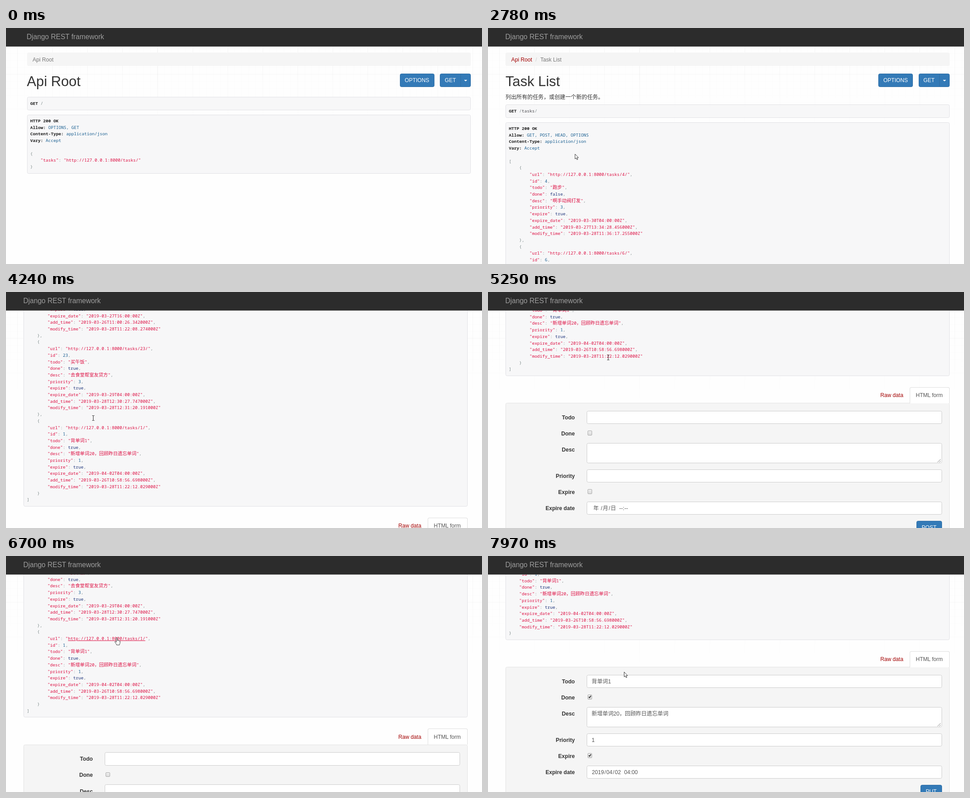
An HTML page for the animation above (8000 ms loop, 1061 by 528 pixels).

```html
<!DOCTYPE html>
<html lang="zh">
<head>
<meta charset="utf-8">
<title>Task API</title>
<style>
html, body { margin: 0; width: 100%; height: 100%; overflow: hidden; background: #fefefe; }
body { font: 12.13px/20px "Liberation Sans", "Noto Sans CJK SC", sans-serif; color: #333; }
#stage { position: relative; width: 1061px; height: 528px; overflow: hidden; }
#stage div { position: absolute; box-sizing: border-box; white-space: pre; }
#grid { left: -53px; top: -53px; width: 1120px; height: 300px;
  background:
    repeating-linear-gradient(90deg, #00000006 0 1px, #0000 1px 78.1px),
    repeating-linear-gradient(#00000006 0 1px, #0000 1px 78.1px),
    repeating-linear-gradient(90deg, #00000003 0 1px, #0000 1px 15.62px),
    repeating-linear-gradient(#00000003 0 1px, #0000 1px 15.62px);
  -webkit-mask-image: linear-gradient(#000 40%, transparent);
  mask-image: linear-gradient(#000 40%, transparent); }
#nav { left: 0; top: 0; width: 1061px; height: 42px; background: #2c2c2c padding-box;
  border-bottom: 1px solid #2c2c2c80; }
#brand { top: 9.5px; font-size: 15.65px; color: #9d9d9d; }
.page { top: 0; width: 1061px; height: 0; }
#stage .title { font-size: 31.2px; }
.crumbs { background: #f5f5f5; border-radius: 3.5px; }
.pre { background: #f7f7f8; border: 1px solid #e1e1e5; border-radius: 3.5px; }
.code { font-family: "Noto Sans Mono", monospace; font-size: 9.57px; }
.code b { color: #222; }
.code em { font: 10.4px/0 "Noto Sans CJK SC", sans-serif; }
.str { color: #d14; }
.lit { color: #195f91; }
.kwd { color: #1e347b; }
.pun { color: #7f8c8c; }
.pln { color: #48484c; }
.hover .target { text-decoration: underline; }
.red { color: #a30000; }
.gray { color: #777; }
.sep { color: #ccc; padding: 0 7.5px; }
.btn { background: #337ab7; border: 1px solid #2e6da4; border-radius: 3.5px; color: #fff;
  text-align: center; line-height: 28px; }
.start { border-radius: 3.5px 0 0 3.5px; }
.end { border-radius: 0 3.5px 3.5px 0; }
.danger { background: #d9534f; border-color: #d43f3a; }
.caret { border: 3.5px solid transparent; border-top-color: #fff; border-bottom: 0; }
.panel { background: #f5f5f5; border: 1px solid #e3e3e3; border-radius: 3.5px; }
.tab { background: #fff; border: 1px solid #ddd; border-bottom: 0; border-radius: 3.5px 3.5px 0 0; }
.label { font-weight: bold; text-align: right; width: 120px; }
.field { background: #fff; border: 1px solid #ccc; border-radius: 3.5px; }
.value { color: #555; }
.value span { padding: 0 1px; }
.check { background: linear-gradient(#eee, #dcdcdc); border: 1px solid #aaa; border-radius: 2px; }
svg { position: absolute; left: 0; top: 0; overflow: visible; fill: none; }
</style>
</head>
<body>
<div id="stage">
  <div id="grid"></div>
  <div id="pages"></div>
  <div id="nav"><div id="brand">Django REST framework</div></div>
  <svg id="cursor" width="1" height="1">
    <circle id="ring" r="10.5" fill="#ff07"/>
    <path id="arrow" fill="#fff" stroke="#222" stroke-width=".9"
      d="M.5 .5V11.5L3 9.2L4.8 13.2L6.6 12.4L4.9 8.6H8.2Z"/>
    <path id="hand" fill="#fff" stroke="#222" stroke-width=".9"
      d="M-1 10V1.2a1.2 1.2 0 0 1 2.4 0V6.4c0-.9 2-.9 2 .2c.2-.8 2-.7 2 .5c.3-.7 1.8-.5 1.8.6V11c0 2-1.2 2.8-1.2 5H-.5C-.8 13.5-3 12-4.2 9.4c-.5-1.2.9-1.8 1.7-.9Z"/>
    <path id="beam" stroke="#222" d="M-2.5-5.5H-.7L0-5L.7-5.5H2.5M0-5V5M-2.5 5.5H-.7L0 5L.7 5.5H2.5"/>
  </svg>
</div>
<script>
const LINE = 14.7, HOST = 'http://127.0.0.1:8000/tasks/';
const $ = id => document.getElementById(id);

// Markup helpers: a box by its edges, a text by its left edge and middle line
const box = (cls, x, y, x2, y2, body = '') =>
  `<div class="${cls}" style="left:${x}px;top:${y}px;width:${x2 - x}px;height:${y2 - y}px">${body}</div>`;
const text = (cls, x, mid, body) =>
  `<div class="${cls}" style="left:${x}px;top:${mid - 9.5}px">${body}</div>`;
const span = (cls, body) => `<span class="${cls}">${body}</span>`;
const code = (mid, body) => text('code', 46.5, mid - .5, body);

const paint = line => line.replace(/"([^"]*)"|true|false|\d+|[{}\[\],:]+/g, (m, str) => {
  if (str !== undefined) {
    const body = str.startsWith('http') ? `<span class="link">${str}</span>`
      : str.replace(/[\u2014\u3000-\u9fff\uff0c]+/g, '<em>$&</em>');
    return span('str', `"${body}"`);
  }
  return span(/\d/.test(m) ? 'lit' : /\w/.test(m) ? 'kwd' : 'pun', m);
});

const tasks = [
  [4, '跑步', false, '啊手动阀打发', 3, '03-30T04', '03-27T13:34:28.456', '03-28T11:36:17.255'],
  [6, '买车票', false, '北京——上海 周五', 3, '03-30T08', '03-28T01:24:24.332', '03-28T11:55:21.718'],
  [2, '拿快递', false, '岚舟快递5点前，编号2618', 2, '03-27T16', '03-26T11:00:26.342', '03-28T11:22:08.274'],
  [23, '买午饭', true, '去食堂帮室友贷方', 3, '03-29T04', '03-28T12:30:27.747', '03-28T12:31:20.191'],
  [1, '背单词1', true, '新增单词20，回顾昨日遗忘单词', 1, '04-02T04', '03-26T10:58:56.698', '03-28T11:22:12.029']
].map(([id, todo, done, desc, priority, due, added, changed]) => ({
  url: `${HOST}${id}/`, id, todo, done, desc, priority, expire: true,
  expire_date: `2019-${due}:00:00Z`,
  add_time: `2019-${added}000Z`,
  modify_time: `2019-${changed}000Z`
}));
const json = data => JSON.stringify(data, null, 4).split('\n');

function header(title, crumbs, top, path, allow, body) {
  const head = [['Allow', allow], ['Content-Type', 'application/json'], ['Vary', 'Accept']]
    .map(([k, v]) => `<b>${k}:</b> ${span('lit', v)}`);
  const lines = ['<b>HTTP 200 OK</b>', ...head, '', ...body.map(paint)];
  const first = top + 54;
  const end = first + lines.length * LINE;
  const trail = crumbs.map((c, i) => span(i < crumbs.length - 1 ? 'red' : 'gray', c)).join(span('sep', '/'));
  const html = box('crumbs', 39, 54.5, 1028.5, 85) + text('', 51.8, 70, trail) +
    text('title', 39, 119.5, title) +
    box('btn', 870, 102, 947, 131.5, 'OPTIONS') +
    box('btn start', 959.5, 102, 1006.5, 131.5, 'GET') +
    box('btn end', 1005.5, 102, 1028.5, 131.5) + box('caret', 1013.7, 115.8, 1020.7, 119.3) +
    box('pre', 39, top, 1028.5, top + 30) +
    code(top + 15, `<b>GET</b> ${path.replace(/\w+|\//g, m => span(m === '/' ? 'pun' : 'pln', m))}`) +
    box('pre', 39, top + 39.5, 1028.5, end) +
    lines.map((l, i) => code(first + i * LINE, l)).join('');
  return { html, end };
}

const parts = list => list.map(p => /[/ ]/.test(p) ? p : `<span>${p}</span>`).join('');

function form(top, action, left, v) {
  const y = n => top + n;
  const tick = v.on ? '<svg width="8" height="8"><path d="M1.6 4L3.3 6L6.6 1.6" stroke="#333" stroke-width="1.8"/></svg>' : '';
  const labels = { Todo: 32, Done: 68, Desc: 104.5, Priority: 163.5, Expire: 199.5, 'Expire date': 235.5 };
  const fields = [[17.5, 47], [89.7, 135], [148.5, 178], [220.7, 250]];
  return box('panel', 39, y(0), 1028.5, y(315)) +
    text('red', 874.5, y(-17.5), 'Raw data') +
    box('tab', 940, y(-35.5), 1028.5, y(.5)) + text('value', 953.5, y(-17.5), 'HTML form') +
    Object.entries(labels).map(([name, n]) => text('label', 73.5, y(n), name)).join('') +
    fields.map(([a, b]) => box('field', 220, y(a), 1011.5, y(b))).join('') +
    box('', 1002, y(126), 1010, y(134), '<svg width="8" height="8"><path d="M0 7L7 0M4 7L7 4" stroke="#777" stroke-width=".9"/></svg>') +
    box('check', 222, y(62), 232.3, y(72.3), tick) + box('check', 222, y(193), 232.3, y(203.3), tick) +
    text('value', 231, y(32.5), v.todo) + text('value', 231, y(104.5), v.desc) +
    text('value', 231, y(163), v.priority) +
    text('value', 230.5, y(235.5), parts(v.date)) + text('value', v.timeX, y(235.5), v.time) +
    box('btn', left, y(263.5), 1011.5, y(293), action);
}

const root = header('Api Root', ['Api Root'], 154, '/', 'OPTIONS, GET', json({ tasks: HOST }));
const list = header('Task List', ['Api Root', 'Task List'], 171, '/tasks/',
  'GET, POST, HEAD, OPTIONS', json(tasks));
const last = tasks[4];
const item = header('Task Instance', ['Api Root', 'Task List', 'Task Instance'], 171, '/tasks/1/',
  'GET, PUT, PATCH, DELETE, HEAD, OPTIONS', json(last));

const blank = { todo: '', desc: '', priority: '', timeX: 292.5, time: '--:--',
  date: ['&nbsp;年&nbsp;', '/', '月', '/', '日'] };
const filled = { ...last, on: true, timeX: 303.5, time: '04:00', date: ['2019', '/', '04', '/', '02'] };

$('pages').innerHTML = [
  root.html,
  list.html + text('', 39, 154, '列出所有的任务，或创建一个新的任务。') + form(list.end + 60.3, 'POST', 955, blank),
  item.html + text('', 39, 154, '检索、更新或删除一个任务。') +
    box('btn danger', 787.5, 102, 857.5, 131.5, 'DELETE') + form(item.end + 60.3, 'PUT', 964, filled)
].map(html => `<div class="page">${html}</div>`).join('');
const pages = [...document.querySelectorAll('.page')];
pages.forEach(p => [...p.querySelectorAll('.link')].pop().classList.add('target'));

// Bursts of motion: start, end, number of pictures
const bursts = [[440, 910, 7], [1140, 1370, 4], [2300, 2390, 2], [2540, 2780, 4], [2930, 3090, 3],
  [3330, 3840, 8], [4150, 4940, 11], [5020, 5250, 4], [5560, 6320, 11], [6390, 6700, 5],
  [7100, 7480, 6], [7640, 7970, 5]];
const mouse = [[440, 976, 513], [910, 163.5, 290], [1063, 163.5, 290], [1370, 174.5, 297],
  [2200, 174.5, 297], [2390, 182, 291], [2460, 182, 291], [2780, 193.5, 281.5], [3840, 194.5, 282],
  [4620, 194.5, 282], [4940, 264, 184], [5250, 268, 146.5], [6100, 268, 146.5], [6320, 262, 160],
  [6700, 247, 183], [7170, 247, 183], [7480, 303, 259]];
const scroll = [[2855, 0], [3090, 260], [3255, 260], [3475, 520], [3840, 692], [4071, 692],
  [4229, 730], [4700, 1021.9], [5485, 1021.9], [5800, 935], [5950, 935], [6240, 848.5],
  [7099, 848.5], [7100, 0], [7557, 0], [7970, 286.9]];
const shapes = [[0, ''], [440, 'arrow'], [830, 'hand'], [1920, 'arrow'], [2070, 'hand'],
  [2300, 'arrow'], [3700, 'beam'], [6540, 'hand'], [7100, 'arrow']];

// Holds time at the latest picture of the latest burst
function snap(t) {
  const b = bursts.filter(b => t >= b[0]).pop();
  if (!b) return 0;
  const [from, to, n] = b, gap = (to - from) / (n - 1);
  return from + Math.min(n - 1, Math.floor((t - from + 1) / gap)) * gap;
}

function at(keys, t) {
  const i = keys.findIndex(k => k[0] >= t);
  if (i === 0) return keys[0].slice(1);
  if (i < 0) return keys[keys.length - 1].slice(1);
  const a = keys[i - 1], b = keys[i], p = (t - a[0]) / (b[0] - a[0]);
  return a.slice(1).map((v, j) => v + (b[j + 1] - v) * p);
}

function draw() {
  const t = performance.now() % 8000, held = snap(t);
  const page = t < 2300 ? 0 : t < 7100 ? 1 : 2;
  const shift = page ? 0 : 7.5;
  const [x, y] = at(mouse, held), [top] = at(scroll, held);
  const shape = shapes.filter(s => t >= s[0]).pop()[1];
  pages.forEach((p, i) => p.style.display = i === page ? '' : 'none');
  // Plain offsets keep the text on whole pixels
  pages[page].style.left = shift + 'px';
  pages[page].style.top = -top + 'px';
  pages[0].classList.toggle('hover', t >= 830);
  pages[1].classList.toggle('hover', t >= 6540);
  $('brand').style.left = 38.5 + shift + 'px';
  $('cursor').style.transform = `translate(${x}px, ${y}px)`;
  for (const id of ['arrow', 'hand', 'beam']) $(id).style.display = id === shape ? '' : 'none';
  const click = (t >= 1680 && t < 1750) || (t >= 6860 && t < 6930);
  $('ring').style.display = click ? '' : 'none';
  requestAnimationFrame(draw);
}
draw();
</script>
</body>
</html>
```
